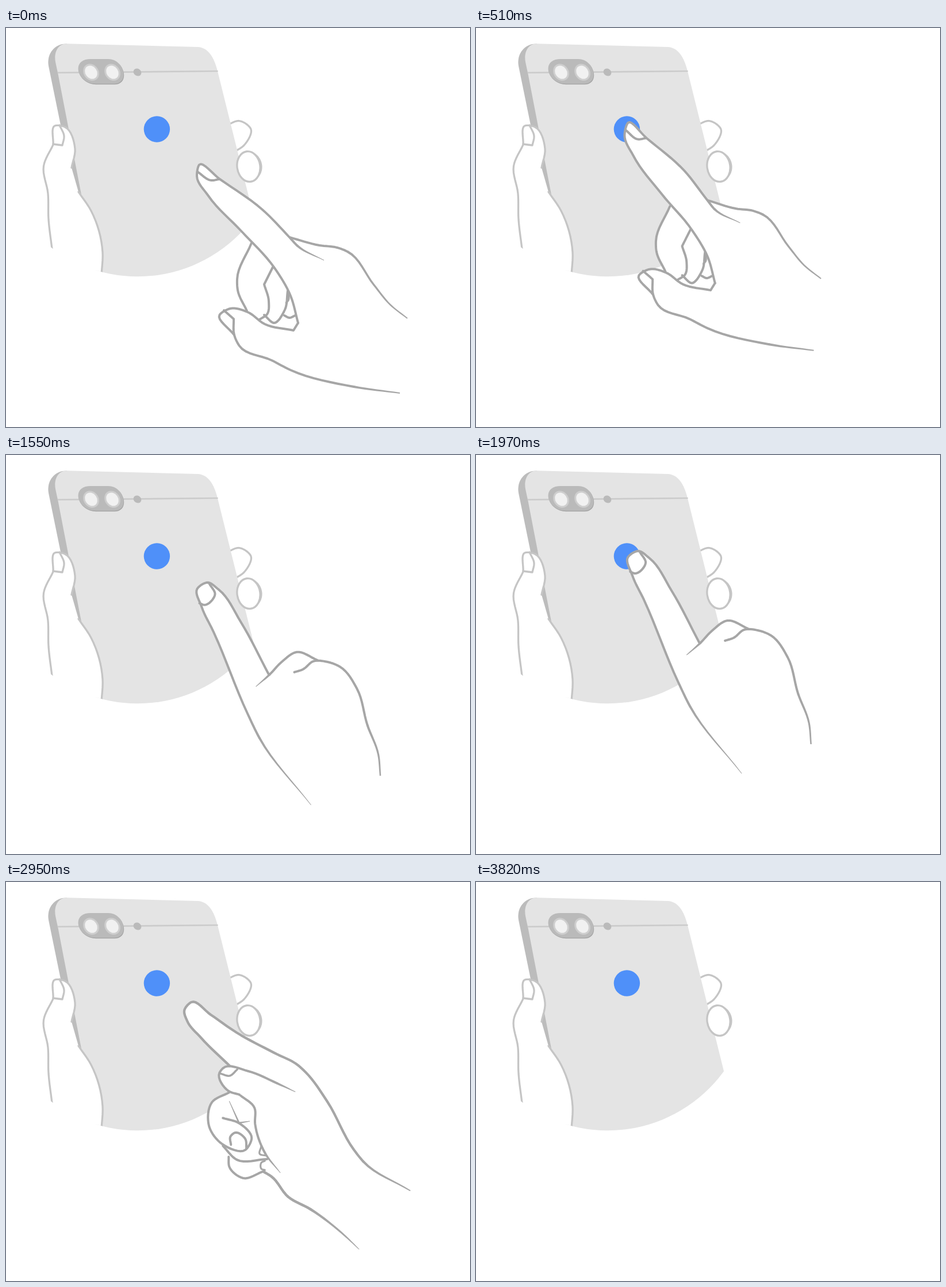
An HTML page that plays this animation: 807x694 px, repeating every 3.99 s.

```html
<!DOCTYPE html>
<html lang="en">
<head>
<meta charset="utf-8">
<title>Tap the sensor</title>
<style>
html, body { margin: 0; width: 100%; height: 100%; overflow: hidden; background: #fff; }
svg { display: block; width: 807px; height: 694px; }
path { stroke-linecap: round; stroke-linejoin: round; }
</style>
</head>
<body>
<svg viewBox="0 0 807 694">
  <defs>
    <clipPath id="disc"><circle cx="229" cy="182.5" r="249.7"/></clipPath>
    <path id="plate" d="M147 54H178C192 54 204 66 204.500 81C204.500 91 198 97 188 97H156C140 97 126 85 125.500 71C125.500 60 134 54 147 54Z"/>
    <g id="lens" transform="rotate(-35)">
      <ellipse rx="13" ry="15.500" fill="#cecece"/>
      <ellipse rx="10" ry="12.300" fill="#f1f1f1"/>
    </g>
  </defs>
  <g clip-path="url(#disc)">
    <g id="behind"></g>
    <path fill="#bcbcbc" d="M106 27.500C88 26 70 42 74 66L128 330H160L120 60Z"/>
    <path fill="#e4e4e4" d="M105 27.300L333 33C352 34 362 51 368 75L440 365V440H160L90.500 80L86 59C83 43 90 28 105 27.300Z"/>
    <path stroke="#cbcbcb" stroke-width="2.600" d="M91 77.700L367.500 75"/>
    <use href="#plate" fill="#a2a2a2" y="1.300" x=".7"/>
    <use href="#plate" fill="#bababa"/>
    <use href="#lens" x="0" transform="translate(148 77)"/>
    <use href="#lens" x="0" transform="translate(185 77)"/>
    <ellipse cx="228.500" cy="77" rx="7.200" ry="6.200" fill="#bababa" transform="rotate(35 228.500 77)"/>
    <circle cx="262.400" cy="176" r="22.700" fill="#4f90f9"/>
    <g id="holder">
      <g transform="rotate(-8 422 241)">
        <ellipse cx="424.500" cy="241" rx="21" ry="25" fill="#c5c5c5"/>
        <ellipse cx="422" cy="241" rx="20" ry="26.500" fill="#fff" stroke="#c5c5c5" stroke-width="3.300"/>
      </g>
    </g>
  </g>
  <g id="tap"></g>
  <g id="over"></g>
  <g id="side"></g>
</svg>
<script>
const TAU = Math.PI * 2, LOOP = 3990, TICK = 30;
const mix = (a, b, u) => a + (b - a) * u;
const dist = (a, b) => a && b ? Math.hypot(b[0] - a[0], b[1] - a[1]) : 0;
const trace = p => 'M' + p.map(q => q[0].toFixed(2) + ' ' + q[1].toFixed(2)).join('L');

// Smooth curve through points; a doubled point makes a corner.
function spline(p) {
  const dir = p.map((q, i) => {
    const a = dist(p[i - 1], q), b = dist(q, p[i + 1]);
    return [0, 1].map(k => {
      const u = a ? (q[k] - p[i - 1][k]) / a : 0;
      const v = b ? (p[i + 1][k] - q[k]) / b : 0;
      return a && b ? (u * b + v * a) / (a + b) : u + v;
    });
  });
  const out = [p[0]];
  for (let i = 0; i < p.length - 1; i++) {
    const len = dist(p[i], p[i + 1]);
    for (let n = 1; len && n <= 8; n++) {
      const t = n / 8, s = 1 - t;
      out.push([0, 1].map(k =>
        p[i][k] * s * s * (1 + 2 * t) + p[i + 1][k] * t * t * (3 - 2 * t) +
        len * t * s * (dir[i][k] * s - dir[i + 1][k] * t)));
    }
  }
  return out;
}

// Polygon that narrows from width w to width end.
function taper(p, w, end) {
  const left = [], right = [];
  p.forEach((q, i) => {
    const a = p[Math.max(0, i - 1)], b = p[Math.min(p.length - 1, i + 1)];
    const h = mix(w, end, i / (p.length - 1)) / 2 / (dist(a, b) || 1);
    const nx = (a[1] - b[1]) * h, ny = (b[0] - a[0]) * h;
    left.push([q[0] + nx, q[1] + ny]);
    right.unshift([q[0] - nx, q[1] - ny]);
  });
  return trace(left.concat(right)) + 'Z';
}

// A group of brush lines that can be redrawn through a point mapping.
function drawing(id, color, width) {
  const group = document.getElementById(id), lines = [];
  let skin, edges = [];
  const path = (attrs, first) => {
    const el = document.createElementNS(document.documentElement.firstChild ? group.namespaceURI : '', 'path');
    for (const k in attrs) el.setAttribute(k, attrs[k]);
    first ? group.prepend(el) : group.append(el);
    return el;
  };
  return {
    group,
    // tail: how many closing segments of the curve get thinner
    line(points, { w = width, tail = 0, end = 1, fill = 'none' } = {}) {
      const l = { w, tail, end, pts: points.split(' ').map(q => q.split(',').map(Number)) };
      l.body = path({ stroke: color, 'stroke-width': w, fill });
      if (fill !== 'none') {
        l.body.setAttribute('stroke', 'none');
        l.ink = path({ stroke: color, 'stroke-width': w, fill: 'none' });
      }
      if (tail) l.tip = path({ fill: color });
      lines.push(l);
      return l;
    },
    // White inside, bounded by the given lines end to end
    inside(...list) {
      edges = list;
      skin = path({ fill: '#fff' }, true);
    },
    draw(map = q => q) {
      for (const l of lines) {
        const c = l.curve = spline(l.pts.map(map)), cut = c.length - l.tail * 8;
        l.body.setAttribute('d', trace(l.ink ? c : c.slice(0, cut)));
        if (l.ink) l.ink.setAttribute('d', trace(c.slice(0, cut)));
        if (l.tip) l.tip.setAttribute('d', taper(c.slice(cut - 1), l.w, l.end));
      }
      if (!skin) return;
      const rim = [];
      for (const { curve } of edges) {
        const last = rim[rim.length - 1];
        const flip = last && dist(last, curve[0]) > dist(last, curve[curve.length - 1]);
        rim.push(...(flip ? [...curve].reverse() : curve));
      }
      skin.setAttribute('d', trace(rim) + 'Z');
    }
  };
}

const solid = { fill: '#fff' };

function drawHolder() {
  const back = drawing('behind', '#c5c5c5', 3.3);
  back.line('386,168 405,161.5 426,176 414,204 396,216', solid);
  back.draw();
  const h = drawing('holder', '#c5c5c5', 3.3);
  h.inside(
    h.line('80,384 74,333 73,288 65.5,240 82,203 82,203 85,170 102,172 120,210 114,243'),
    h.line('126,285 148,318 168,390 166,430'));
  h.line('82,202 98,204 98,204 101,188 93,169');
  h.draw();
}

function drawTap() {
  const h = drawing('tap', '#a6a6a6', 4);
  const curl = h.line('427,374 402,437 403,456 419,492');
  h.line('464,416 449,446 449,446 457,475 454,498 441,507');
  h.line('490,457 485,490 466,513 449,499');
  h.line('503,500 493,504 484,500');
  h.line('491,460 491,474 487,478', { w: 3 });
  const thumb = h.line('508,513 500,526 500,526 450,515 420,494 390,488 371.5,499 397,534');
  const base = h.line('379,491 396,506 396,506 397,534 406,553 462,578 495,595 605,624 685,635', { tail: 1, end: 2 });
  const back = h.line('493,364 545,378 576,382 594,389 640,447 668,481 698,505', { tail: 3, end: 2 });
  h.line('508,513 495,466 466,416 410,354 352,292 332,258 336,238 372,263 446,316 493,364 507,379 553,404', { ...solid, tail: 1 });
  h.line('333,250 357,265 371,263');
  h.inside(curl, thumb, base, back);
  return h;
}

function drawOver() {
  const h = drawing('over', '#a6a6a6', 4);
  const finger = h.line('388,326 340,236 301,179 282,167 264,178 272,210 292,252 352,396 372,437 462,554', { ...solid, tail: 1 });
  h.line('268,203 276,206 295,187 285,169');
  const web = h.line('473,302 437,288 410,306 390,327 366,348', { tail: 1 });
  const back = h.line('433,323 448,318 466,304 490,305 513,314 542,352 560,415 579,466 582.5,503', { tail: 2, end: 2.5 });
  h.inside(finger, back, web);
  h.draw();
  return h;
}

function drawSide() {
  const h = drawing('side', '#a6a6a6', 4);
  h.line('331,424 355,448 408,447');
  const little = h.line('341,443 342,460 366,480 402,468');
  h.line('404,450 398,453 398,464 404,466', { w: 3.2 });
  h.line('398,424 395,438 407,441', { w: 3.2 });
  const base = h.line('402,469 415,477 445,513 483,534 545,582 568,604', { w: 4.5, tail: 2 });
  const fist = h.line('342,331 312,348 307,390 330,421 370,431 381,410 360,385 331,375.5', solid);
  h.line('345,422 344,408 352,401 370,412 372,429');
  for (const end of ['342,346', '378,381']) h.line('359,384 ' + end, { w: 3, tail: 1 });
  const finger = h.line('345,287 293,236 269,207 264,188 276,174 310,196 355,227 420,262 462,284 475,296 512,346 559,431 575,451 657,502', { ...solid, w: 4.3, tail: 1, end: 2 });
  h.line('360,335 386,358 387,386 404,436 431,471', { tail: 1 });
  h.line('360,335 340,328 325,297 331,289 375,294 425,315 457,330', { ...solid, tail: 1 });
  h.line('326,298 343,302 356,291', { w: 3.6 });
  h.inside(finger, base, little, fist);
  h.draw();
  return h;
}

// Pressing moves the hand in and straightens what lies above the knuckles.
function pressed([x, y], u) {
  const k = Math.max(0, 374 - y);
  return [mix(x, .97 * x - 77 + .115 * k, u), mix(y, .96 * y - 48.8 - .11 * k, u)];
}

const soft = p => p / 2 + (1 - Math.cos(TAU * p / 2)) / 4;

function show({ group }, x, y, alpha) {
  group.setAttribute('transform', `translate(${x.toFixed(2)} ${y.toFixed(2)})`);
  group.setAttribute('opacity', alpha.toFixed(3));
  group.setAttribute('display', alpha > 0 ? 'inline' : 'none');
}

drawHolder();
const tap = drawTap(), over = drawOver(), side = drawSide();

function render(t) {
  // Progress of a phase that advances n times, first at start.
  const run = (start, n) => Math.max(0, Math.min(1, (Math.floor((t - start) / TICK) + 1) / n));

  const press = soft(run(30, 17)) - soft(run(810, 7));
  tap.draw(q => pressed(q, press));
  show(tap, 0, 0, 1 - soft(run(1020, 5)));

  const enter = 1 - soft(run(1460, 14)), leave = soft(run(1910, 18));
  show(over, 99 * enter + 61 * leave - 7, 79 * enter + 47 * leave - 5.5, run(1340, 4) - run(2450, 4));

  const away = 1 - run(2920, 8) + run(3330, 8);
  show(side, 74 * away - 9.25, 56 * away - 7, run(2740, 4) - run(3670, 6));
}

const begin = performance.now();
function frame() {
  render((performance.now() - begin) % LOOP);
  requestAnimationFrame(frame);
}
render(0);
requestAnimationFrame(frame);
</script>
</body>
</html>
```
